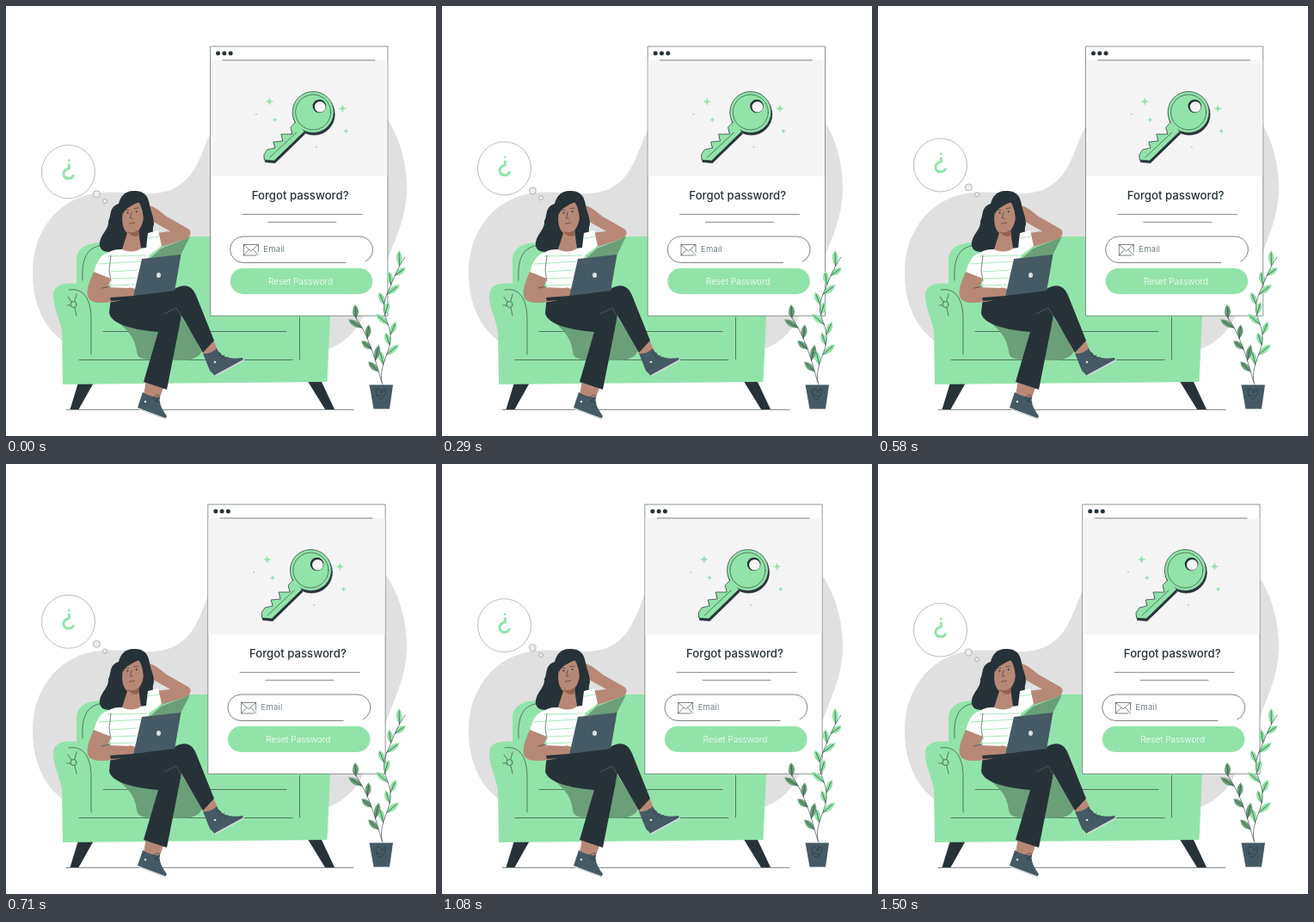
An HTML page for the animation above (1540 ms loop, 500 by 500 pixels).

```html
<!DOCTYPE html>
<html lang="en">
<head>
<meta charset="utf-8">
<title>Forgot password</title>
<style>
  html, body { margin: 0; width: 100%; height: 100%; overflow: hidden; background: #fff; }
  svg { display: block; width: 100vw; height: 100vh; }
  text { font-family: Inter, "Open Sans", sans-serif; }
  .green { fill: #92e3a9; }
  .dark { fill: #263238; }
  .slate { fill: #455a64; }
  .skin { fill: #b78876; }
  .shade { fill: #6a9f79; }
  .line { fill: none; stroke: #263238; stroke-width: .6; stroke-linecap: round; stroke-linejoin: round; }
  .stripe { fill: none; stroke: #92e3a9; stroke-width: .8; }
</style>
</head>
<body>
<svg viewBox="0 0 500 500">
  <path fill="#e0e0e0" d="M68 391C44 375 31 345 31 311C31 255 68 218 116 216.500C145 215.500 163 221 184 216C220 208 226 172 238 147C270 78 400 72 438 124C456 147 466 180 466 211C466 245 453 270 445 292C436 315 428 328 421 347C412 375 395 392 372 400L240 400Z"/>

  <g id="sofa">
    <path class="dark" d="M84 438H102L84.500 469H74.500ZM350 435H366L382 469H371Z"/>
    <path class="line" d="M70 469.400H404"/>
    <path class="green" d="M82 335V296C82 281 94 276 110 275L202 268H330C345 268 352 280 352 300V360H377L373.500 437L66 440L65 378C62 362 55 351 55 336C55 325 66 321 82 323Z"/>
    <path class="line" d="M89 319C88 297 92 283 108 279L130 277M73 330C91 327 99 342 99 364V405M85 411.500H333M113 378.500H168M218 378.500H326M341.500 362V411"/>
    <path class="line" d="M82 347a3.500 3.500 0 1 1-7 0a3.500 3.500 0 1 1 7 0M76 344L72 338M80 343L82 335M75 348H71M80 351L82 360"/>
    <path class="shade" d="M168 293L180 282L208 271L214 268L203 290ZM122 360C137 374 150 382 152 402C153 410 160 412 172 410L180 376ZM204 362L190 412H207C221 411 228 405 228 399Z"/>
  </g>

  <g id="bubble">
    <circle cx="72.5" cy="193" r="31" fill="#fff" stroke="#7b8488" stroke-width=".55"/>
    <path fill="none" stroke="#92e3a9" stroke-width="3" d="M73.300 183.800V189C67 191 66 195 67.500 198C70 202.500 78 201.500 78.500 196.500"/>
    <circle class="green" cx="73.3" cy="180" r="1.4"/>
    <g fill="#eee" stroke="#7b8488" stroke-width=".55"><circle cx="105.300" cy="219" r="4"/><circle cx="115" cy="227.300" r="2.500"/></g>
  </g>

  <g id="woman">
    <path class="skin" d="M162 231C172 232 178 238 187 245L210 258C217 261 216 268 208 271L178 281L174 264L191 262L168 249Z"/>
    <path class="dark" d="M150 215C139 214 133 221 131 230C119 234 123 244 119 250C120 261 108 266 109 279C113 291 127 283 136 288C148 284 160 288 169 281C176 273 168 264 172 254C172 244 168 239 167 231C165 220 160 215 150 215Z"/>
    <path fill="#fff" d="M119 287C128 281 134 284 147 283L163 281L165 264L177 261L181 279L166 290L163 330L122 338L121 317L102 310C105 299 109 289 119 287Z"/>
    <path class="stripe" d="M118 291L163 290M107 300L157 297M122 309L153 307M122 317L151 316M122 325L150 324M165 270L178 268"/>
    <path class="line" d="M122 290L120 307L122 320"/>
    <path class="skin" d="M137 235C146 232 152 226 159 229C162 240 160 255 154 261L157 282C150 287 140 286 135 283L141 264C134 258 134 245 137 235Z"/>
    <path fill="#95614f" d="M141 262C147 265 151 262 155 260L154 267C149 269 144 267 141 262Z"/>
    <path class="dark" d="M136 242C132 226 146 218 157 222C164 225 163 240 160 248C159 238 157 231 154 228C149 231 139 234 136 242Z"/>
    <path class="line" d="M139 237L143 237.500M149 235.500L154 235M146 240L144.500 246.500L147 247"/>
    <path fill="none" stroke="#95614f" stroke-width="1.300" d="M143 253L150 252"/>
    <circle class="dark" cx="141.500" cy="240.500" r=".9"/>
    <circle class="dark" cx="151.700" cy="239" r=".9"/>

    <path class="skin" d="M163 434L184 441L178 458L160 453ZM223 394L240 386L247 402L232 408Z"/>
    <path class="dark" d="M122 337L150 336L196 329C208 322 217 325 222 339L242 389L229 403L204 360L187 446L160 437L177 379C150 377 122 370 120 357Z"/>
    <path fill="none" stroke="#708087" stroke-width=".5" d="M184 358L198 351L206 365"/>
    <path class="slate" d="M159 449C165 453 172 455 179 455C177 462 183 471 187 477L185 480L153 467ZM229 404C235 405 241 402 245 398C250 409 261 411 275 409L276 412L243 430L237 424Z"/>
    <path fill="none" stroke="#d5d9db" stroke-width="1.600" d="M153 468L185.500 480M243 430L277 411.500"/>
    <path class="line" d="M171 456C178 448 182 455 173 459L179 461M245 404C250 402 252 404 247 407M249 410L254 406M254 412L258 408"/>
    <g fill="#e0e0e0"><circle cx="162" cy="460" r="1.300"/><circle cx="243" cy="414" r="1.300"/></g>

    <path class="skin" d="M102 309L122 317L118 327L142 328C149 326 153 331 154 335C139 343 115 347 102 344C89 340 96 323 102 309Z"/>
    <path class="line" d="M112 328L121 326"/>
    <path class="slate" d="M158 294L203.500 289L196 332L148 338Z"/>
    <path class="dark" d="M121 339L148 337L196 331L195 334L149 341L122 343Z"/>
    <ellipse cx="177.500" cy="313" rx="2.500" ry="3" fill="#e0e0e0"/>
  </g>

  <g id="panel">
    <path fill="#fff" stroke="#6d7d75" stroke-width=".8" d="M237.700 47H444V360.300H237.700Z"/>
    <path fill="#f5f5f5" d="M238.200 63H443.500V198H238.200Z"/>
    <path class="line" d="M252 63H429"/>
    <path d="M246.700 55h14.700" stroke="#263238" stroke-width="5" stroke-linecap="round" stroke-dasharray="0 7.300"/>
    <g id="key">
      <g class="dark" stroke="#263238" stroke-width=".7" transform="translate(1 2.500)">
        <circle cx="357.300" cy="123.500" r="24"/>
        <path id="blade" d="M337 135L331 141L333 149L320 149L322 157L311 158L313 165L304 167L300 173L300.500 179L312 180L347 146"/>
      </g>
      <circle class="green" cx="357.300" cy="123.500" r="24" stroke="#263238" stroke-width=".7"/>
      <use href="#blade" class="green" stroke="#263238" stroke-width=".7"/>
      <circle class="line" cx="357.300" cy="123.500" r="20.500"/>
      <path class="line" d="M338 147L307 176"/>
      <circle class="dark" cx="364.500" cy="116.500" r="7.800"/>
      <circle cx="365.300" cy="117.300" r="6.300" fill="#f5f5f5"/>
    </g>
    <g id="sparks" class="green"></g>
    <text class="dark" x="342.300" y="225" text-anchor="middle" font-size="13.200" font-weight="500">Forgot password?</text>
    <path class="line" d="M275 242.300H414M305 251.300H384"/>
    <path class="line" d="M395 298.500H276A15.250 15.250 0 0 1 276 268H411A15.250 15.250 0 0 1 418 297"/>
    <path class="line" d="M293.500 286V277.500H276.500V290H291M276.500 277.500L285 285L293.500 277.500M276.500 290L282.500 283.500M293.500 290L288 283.500"/>
    <text class="slate" x="299.500" y="286.300" font-size="9.500" font-weight="300" letter-spacing=".25">Email</text>
    <rect class="green" x="260.800" y="305" width="165.500" height="30" rx="15"/>
    <text x="342.700" y="323.800" text-anchor="middle" font-size="10.100" font-weight="300" fill="#fff">Reset Password</text>
  </g>

  <g id="plant">
    <g id="leaves"></g>
    <path id="right" class="line" d="M438 440C431 420 449 402 447 382C445 364 434 358 443 335C450 320 453 308 464 292"/>
    <path id="left" class="line" d="M437 438C430 415 424 385 403 357"/>
    <path class="slate" d="M422.500 440.500H450L446 468.500H427.500Z"/>
    <path class="line" d="M431 452C427 443 436 443 437 450C439 441 444 447 440 452C438 460 432 458 431 452L438 454"/>
  </g>
</svg>
<script>
  const $ = id => document.getElementById(id);
  const LOOP = 1540, FRAME = 1000 / 24, CYCLE = 36;

  function addPath(parent, d, attrs) {
    const p = document.createElementNS("http://www.w3.org/2000/svg", "path");
    p.setAttribute("d", d);
    for (const k in attrs) p.setAttribute(k, attrs[k]);
    parent.append(p);
  }

  function spark(x, y, r) {
    const tip = a => `${x + r * Math.cos(a)} ${y + r * Math.sin(a)}`;
    let d = `M${tip(0)}`;
    for (let i = 1; i <= 4; i++) d += `Q${x} ${y} ${tip(i * Math.PI / 2)}`;
    addPath($("sparks"), d, { stroke: "#92e3a9", "stroke-width": .7 });
  }

  // alternating leaves along a stem
  function grow(stem, count, fill) {
    const total = stem.getTotalLength();
    for (let i = 0; i < count; i++) {
      const at = total * (.15 + .77 * i / (count - 1));
      const p = stem.getPointAtLength(at), q = stem.getPointAtLength(at + 1);
      const side = i % 2 ? 1 : -1, n = 17 + 2 * Math.sin(i * 2);
      const angle = Math.atan2(q.y - p.y, q.x - p.x) * 180 / Math.PI + side * 30;
      const transform = `translate(${p.x} ${p.y}) rotate(${angle})`;
      addPath($("leaves"), `M0 0Q${n * .5} -7 ${n} 0Q${n * .5} 7 0 0Z`, { transform, fill });
      addPath($("leaves"), `M0 0H${n * .8}`, { transform, class: "line" });
    }
  }

  // horizontal shake at tenth i of the cycle: alternating sides, doubling up to 4
  function shake(i) {
    const size = Math.min(4, Math.floor(2 ** (Math.min(i, 10 - i) - 1)));
    return i % 2 ? -size : size;
  }

  function draw(time) {
    const step = Math.floor((time % LOOP + 4.9) / FRAME);
    const p = Math.min(1, (step + .5) / CYCLE);
    const i = Math.min(9, Math.floor(p * 10));
    const x = shake(i) + (shake(i + 1) - shake(i)) * (p * 10 - i);
    const y = -10 * (1 - Math.abs(2 * p - 1));
    $("panel").setAttribute("transform", `translate(${x} 0)`);
    $("bubble").setAttribute("transform", `translate(0 ${y})`);
  }

  spark(306.6, 111, 4);
  spark(391.4, 119.3, 4);
  spark(312.8, 132.3, 2.3);
  spark(395.5, 145.5, 2.3);
  spark(291, 126, 1);
  spark(361, 164, 1);
  grow($("right"), 11, "#92e3a9");
  grow($("left"), 6, "#6a9f79");

  const start = performance.now();
  function tick() {
    draw(performance.now() - start);
    requestAnimationFrame(tick);
  }
  tick();
</script>
</body>
</html>
```
